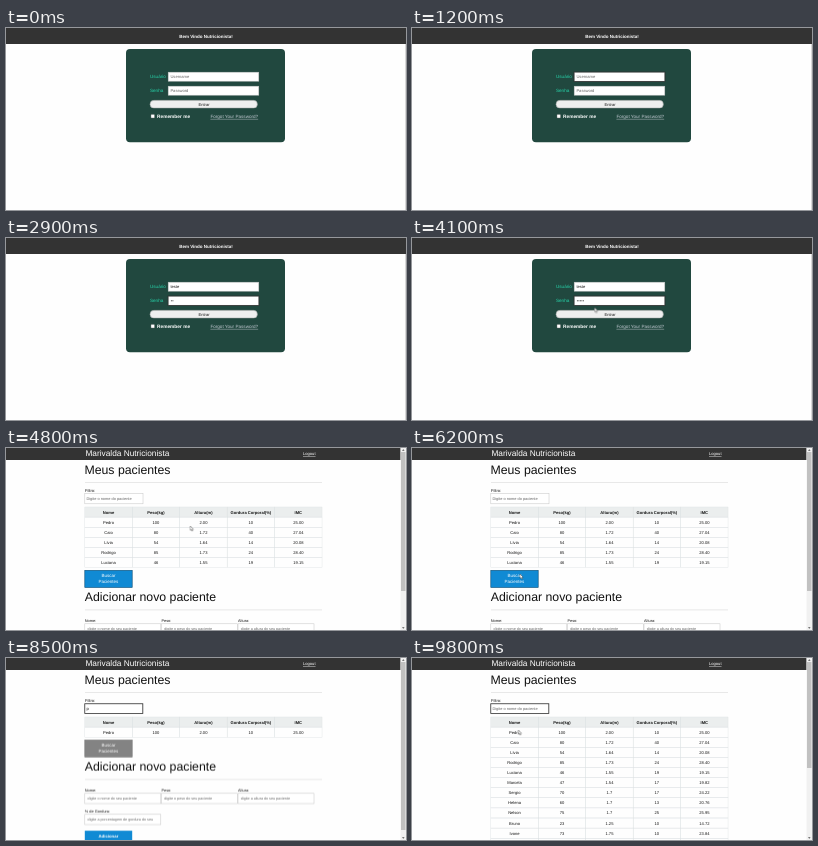
Write an HTML page that moves like this. It is 400 px wide and 182 px high and loops after 9.9 s.

```html
<!DOCTYPE html>
<html lang="pt-BR">
<head>
<meta charset="utf-8">
<title>Nutricionista</title>
<style>
  html, body { margin: 0; width: 100%; height: 100%; overflow: hidden; background: #fefefe; }
  svg { display: block; width: 100%; height: 100%; }
  text { font: 4.1px "Liberation Sans", Arial, sans-serif; fill: #151515; text-rendering: geometricPrecision; white-space: pre; }
  .mid { text-anchor: middle; }
  .bold { font-weight: bold; }
  .link { text-decoration: underline; }
  .light { fill: #fff; }
  .hint { fill: #666; }
  .h1 { font-size: 12.3px; fill: #111; }
  .small { font-size: 3.9px; }
  .form text { font-size: 3.9px; }
  .form .hint { font-size: 3.7px; }
  .label { font-size: 4.6px; fill: #27d5ab; }
  .box { fill: #fff; stroke: #c4c4c4; stroke-width: .5; }
  .ring { fill: none; stroke: #222; stroke-width: .7; }
  .rule { stroke: #d8d8d8; stroke-width: .6; }
  .cell { fill: none; stroke: #dde2e3; stroke-width: .4; }

  .rest { animation: rest 9.9s step-end infinite; }
  @keyframes rest {
    0%, 48.4848% { transform: translateY(40.4px); }
    69.697% { transform: translateY(111.1px); }
    85.8586% { transform: none; }
    96.9697% { transform: translateY(111.1px); }
  }
  .thumb { animation: thumb 9.9s step-end infinite; }
  @keyframes thumb {
    0%, 48.4848% { transform: scaleY(139); }
    69.697% { transform: scaleY(106); }
    85.8586% { transform: scaleY(168); }
    96.9697% { transform: scaleY(106); }
  }
  .find { stroke-width: .6; animation: find 9.9s step-end infinite; }
  @keyframes find {
    0% { fill: #108ad4; stroke: #0c4b73; }
    68.6869% { fill: #838383; stroke: #777; }
  }
  .cursor { animation: cursor 9.9s step-end infinite; }
  @keyframes cursor {
    0% { transform: translate(183px, 70px); opacity: 0; }
    41.4141% { transform: translate(182.5px, 69.5px); opacity: 1; }
    43.4343% { transform: translate(183px, 73px); }
    44.4444% { transform: translate(184px, 76px); }
    45.4545% { transform: translate(184.3px, 78px); opacity: 1; }
    54.5455% { transform: translate(150px, 104px); }
    62.6263% { transform: translate(108px, 126px); }
    68.6869% { transform: translate(99px, 128.5px); }
    72.7273% { transform: translate(102px, 112px); }
    74.7475% { transform: translate(108px, 49px); opacity: 1; }
    82.8283% { transform: translate(108px, 49px); opacity: 0; }
    96.9697% { transform: translate(108px, 58px); opacity: 1; }
    97.9798% { transform: translate(107px, 66px); }
    98.9899% { transform: translate(106.4px, 72px); opacity: 1; }
  }
</style>
</head>
<body>
<svg viewBox="0 0 400 182" preserveAspectRatio="none">
  <g id="login" data-on="0-4800">
    <rect width="400" height="182" fill="#fefefe"/>
    <rect x="399" y="16" width="1" height="166" fill="#d8d8d8"/>
    <rect width="400" height="16" fill="#333"/>
    <text class="mid bold light" x="200" y="9.5" style="font-size:4.5px">Bem Vindo Nutricionista!</text>
    <rect x="120" y="21" width="159" height="93.3" rx="4" fill="#21483f"/>

    <text class="label" x="144" y="50">Usuário</text>
    <text class="label" x="144" y="64.2">Senha</text>
    <rect class="box" x="162.2" y="44.2" width="90.6" height="9"/>
    <rect class="box" x="162.2" y="58.2" width="90.6" height="9"/>
    <text class="hint" x="164.4" y="50.1" data-on="0-1400">Username</text>
    <text class="hint" x="164.4" y="64.1" data-on="0-2800">Password</text>
    <rect class="ring" x="162" y="44" width="91" height="9.4" data-on="1200-2500"/>
    <rect class="ring" x="162" y="58" width="91" height="9.4" data-on="2500-4800"/>

    <rect x="144" y="72.3" width="107.4" height="7.8" rx="3.9" fill="#efefef" stroke="#8c9290" stroke-width=".5"/>
    <text class="mid" x="198" y="77.6">Entrar</text>
    <rect x="145" y="86.4" width="3.5" height="3.5" rx=".6" fill="#fff" stroke="#767676" stroke-width=".4"/>
    <text class="bold light" x="151" y="90" style="font-size:4.8px">Remember me</text>
    <text class="link" x="204.4" y="89.9" style="font-size:4.6px;fill:#c3cad2">Forgot Your Password?</text>
  </g>

  <g id="panel" data-on="4800-9900">
    <rect width="400" height="182" fill="#fefefe"/>
    <rect width="394.6" height="12" fill="#333"/>
    <text class="light" x="79.4" y="8.3" style="font-size:8.3px">Marivalda Nutricionista</text>
    <text class="light link" x="297" y="7.2">Logout</text>
    <rect x="394.6" width="5.4" height="182" fill="#f1f1f1"/>
    <path d="M396 2.8h2.6l-1.3-1.5zM396 179.2h2.6l-1.3 1.5z" fill="#505050"/>
    <g transform="translate(395 4)"><rect class="thumb" width="4.5" height="1" fill="#c1c1c1"/></g>

    <text class="h1" x="78.4" y="26.4">Meus pacientes</text>
    <path class="rule" d="M79 34.5H316"/>
    <text x="79" y="43.7">Filtro:</text>
    <rect class="box" x="78.8" y="45.6" width="58.2" height="10.2"/>
    <text class="hint small" x="80.4" y="52.1" data-on="4800-8500,9600-9900">Digite o nome do paciente</text>
    <rect class="ring" x="78.8" y="45.8" width="58" height="9.8" data-on="7400-9900"/>

    <g id="table"></g>

    <g class="rest">
      <rect class="find" x="78.8" y="81.9" width="47.4" height="17.2"/>
      <text class="mid light" x="102.4" y="89" style="font-size:4.5px">Buscar</text>
      <text class="mid light" x="102.4" y="94.6" style="font-size:4.5px">Pacientes</text>
      <text class="h1" x="78.8" y="112.8">Adicionar novo paciente</text>
      <path class="rule" d="M79 121.5H316"/>
      <g class="form" id="form"></g>
      <rect x="78.8" y="172.7" width="47.4" height="10" fill="#108ad4"/>
      <text class="mid bold light" x="102.4" y="179.2" style="font-size:4.3px">Adicionar</text>
    </g>
  </g>

  <path class="cursor" d="M0 0V4.4L1 3.5L1.7 5.1L2.5 4.8L1.8 3.2H3.1Z" fill="#fff" stroke="#333" stroke-width=".4"/>
</svg>
<script>
  const LOOP = 9900;
  const login = document.getElementById('login');
  const panel = document.getElementById('panel');
  const table = document.getElementById('table');
  const form = document.getElementById('form');

  function add(parent, tag, attrs, content = '') {
    const el = document.createElementNS('http://www.w3.org/2000/svg', tag);
    for (const name in attrs) el.setAttribute(name, attrs[name]);
    el.textContent = content;
    parent.append(el);
    return el;
  }

  // Each step is [start, text]; it stays until the next one begins.
  function type(parent, x, y, steps, end) {
    steps.forEach(([start, word], i) => {
      const stop = i + 1 < steps.length ? steps[i + 1][0] : end;
      add(parent, 'text', { x, y, 'data-on': `${start}-${stop}` }, word);
    });
  }

  type(login, 164.4, 50.1, [[1400, 't|'], [1500, 'te|'], [1800, 'tes|'],
    [1900, 'test|'], [2000, 'teste|'], [2500, 'teste']], 4800);
  [2800, 2900, 3100, 3200, 3600].forEach((start, i) =>
    add(login, 'circle', { cx: 165.4 + i * 1.5, cy: 62.8, r: .55, fill: '#222', 'data-on': `${start}-4800` }));
  type(panel, 80.4, 52.1, [[8500, 'p'], [9000, 'pe'], [9300, 'p']], 9600);

  // Patient table
  const COL = 47.45, ROW = 10.1;
  const rows = [
    'Nome|Peso(kg)|Altura(m)|Gordura Corporal(%)|IMC',
    'Pedro|100|2.00|10|25.00',
    'Caio|80|1.72|40|27.04',
    'Lívia|54|1.64|14|20.08',
    'Rodrigo|85|1.73|24|28.40',
    'Luciana|46|1.55|19|19.15',
    'Marcela|47|1.54|17|19.82',
    'Sergio|70|1.7|17|24.22',
    'Helena|60|1.7|13|20.76',
    'Nelson|75|1.7|25|25.95',
    'Bruno|23|1.25|10|14.72',
    'Ivone|73|1.75|10|23.84',
    'Renata|62|1.68|18|21.97'
  ];
  rows.forEach((row, r) => {
    const from = r > 5 ? 6900 : 4800;
    const on = r < 2 ? '4800-9900' : `${from}-8500,9600-9900`;
    const g = add(table, 'g', { 'data-on': on });
    const y = 59 + r * ROW;
    if (!r) add(g, 'rect', { x: 78.8, y, width: COL * 5, height: ROW, fill: '#ebeeee' });
    row.split('|').forEach((value, c) => {
      const x = 78.8 + c * COL;
      add(g, 'rect', { class: 'cell', x, y, width: COL, height: ROW });
      add(g, 'text', { class: r ? 'mid' : 'mid bold', x: x + COL / 2, y: y + 6.5 }, value);
    });
  });

  // New patient form
  [
    [78.8, 132, 'Nome:', 'digite o nome do seu paciente'],
    [155.4, 132, 'Peso:', 'digite o peso do seu paciente'],
    [232, 132, 'Altura:', 'digite a altura do seu paciente'],
    [78.8, 153, '% de Gordura:', 'digite a porcentagem de gordura do seu']
  ].forEach(([x, y, label, hint]) => {
    add(form, 'text', { x, y: y + 1.4 }, label);
    add(form, 'rect', { class: 'box', x, y: y + 3.4, width: 76, height: 10.2 });
    add(form, 'text', { class: 'hint', x: x + 2.8, y: y + 9.8 }, hint);
  });

  // Turn every data-on span list into step keyframes.
  const names = new Map();
  let css = '';
  document.querySelectorAll('[data-on]').forEach(el => {
    const spans = el.dataset.on;
    if (!names.has(spans)) {
      const name = 'on' + names.size;
      names.set(spans, name);
      const at = (ms, value) => `${(ms / LOOP * 100).toFixed(4)}%{opacity:${value}}`;
      const list = spans.split(',').map(s => s.split('-').map(Number));
      const head = list[0][0] ? at(0, 0) : '';
      const body = list.map(([a, b]) => at(a, 1) + at(b, b < LOOP ? 0 : 1)).join('');
      css += `@keyframes ${name}{${head}${body}}`;
    }
    el.style.animation = `${names.get(spans)} ${LOOP}ms step-end infinite`;
  });
  document.head.append(Object.assign(document.createElement('style'), { textContent: css }));
</script>
</body>
</html>
```
